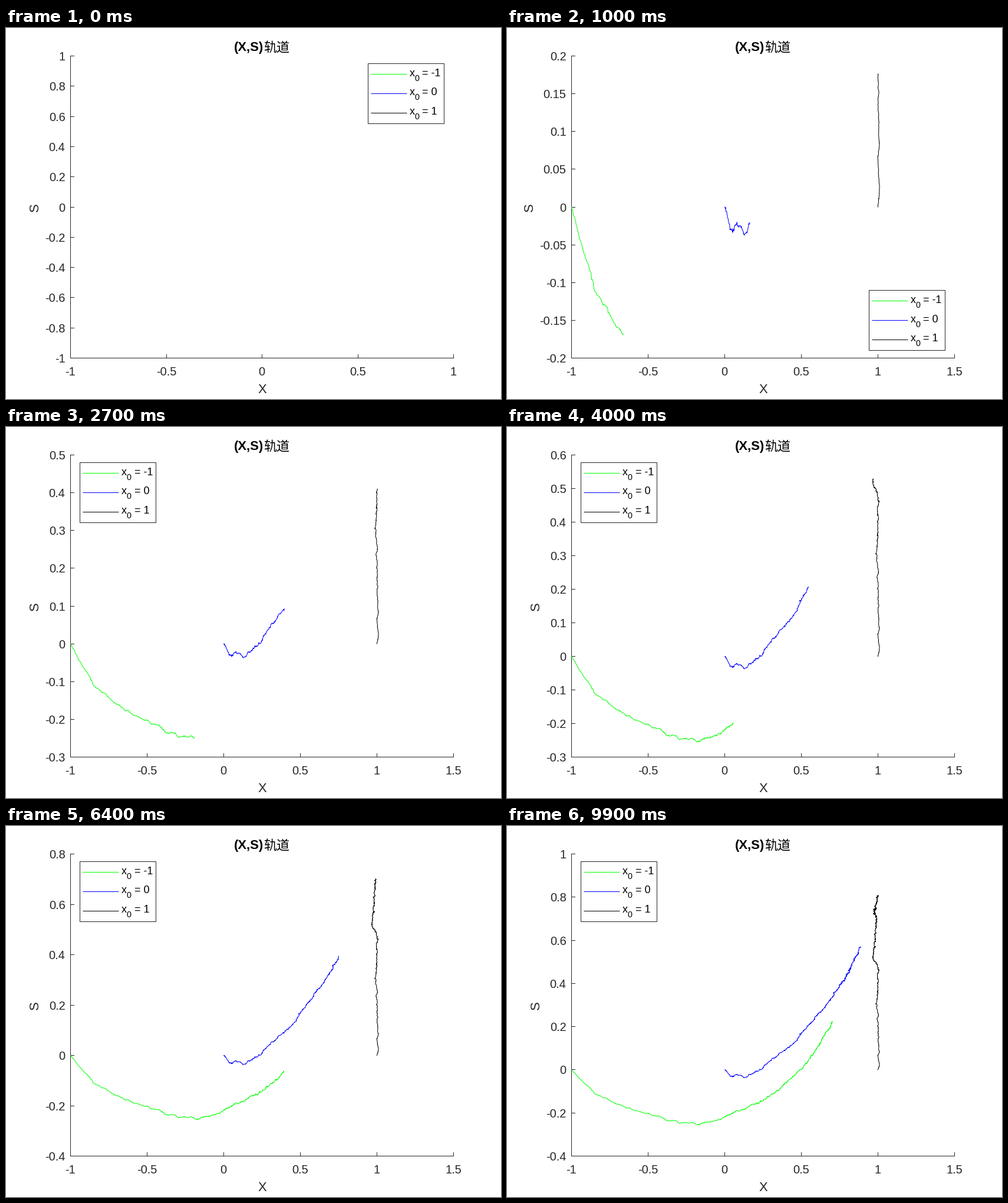
A matplotlib script that plays this animation: 840 by 630 pixels, repeating every 10 s.

```python
import numpy as np
import matplotlib.pyplot as plt
from matplotlib.animation import FuncAnimation
from matplotlib.patches import Rectangle

W, H, DPI = 840, 630, 70
PX = 72 / DPI                      # points per pixel
FRAMES, SUB, DT = 100, 10, .02     # samples and model time per frame
LEFT, RIGHT, TOP, BOTTOM = 109.5, 759.5, 47.5, 560.5
DARK = "#262626"
COLORS = ("#00ff00", "#0000ff", "#000000")

# A few (time, x, s) states that each random path passes through.
STATES = (
    [(0, -1, 0), (5, -.834, -.116), (17, -.446, -.213), (30, -.127, -.25),
     (40, .058, -.198), (64, .393, -.066), (77, .543, .04), (99, .703, .226)],
    [(0, 0, 0), (3, .05, -.032), (5, .078, -.018), (8, .13, -.033),
     (17, .258, .02), (40, .546, .203), (64, .75, .391), (85, .822, .472),
     (99, .88, .57)],
    [(0, 1, 0), (5, 1.004, .093), (17, .993, .287), (33, 1, .476),
     (38, .969, .51), (64, .99, .703), (77, .974, .741), (85, .983, .742),
     (99, 1, .81)],
)

plt.rcParams["path.snap"] = False


def model(t, x0):
    """Noise-free solution of dX = (1 - X) dt, dS = (X - S) dt."""
    tau = DT * t
    fade = np.exp(-tau)
    return np.column_stack([1 - (1 - x0) * fade,
                            1 - ((1 - x0) * tau + 1) * fade])


def trajectory(states, rng):
    """Model curve, drifted through the states, plus mean-reverting noise."""
    keys = np.array(states, float)
    t = np.arange((FRAMES - 1) * SUB + 1) / SUB
    drift = keys[:, 1:] - model(keys[:, 0], keys[0, 1])
    path = model(t, keys[0, 1])
    path += np.column_stack([np.interp(t, keys[:, 0], d) for d in drift.T])
    noise = np.zeros(2)
    for i in range(1, len(t)):
        noise = .9 * noise + rng.normal(0, (.0014, .0011))
        path[i] += noise
    return path


def nice_limits(lo, hi):
    """Smallest 1-2-5 step that covers the range in ten intervals or fewer."""
    for exp in range(-4, 1):
        for m in (1, 2, 5):
            step = m * 10.0 ** exp
            a, b = int(np.floor(lo / step)), int(np.ceil(hi / step))
            if b - a <= 10:
                return a, b, step, -exp


rng = np.random.default_rng(4)
paths = [trajectory(s, rng) for s in STATES]

fig = plt.figure(figsize=(W / DPI, H / DPI), dpi=DPI, facecolor="white")
ax = fig.add_axes([0, 0, 1, 1])
ax.set_xlim(0, W)
ax.set_ylim(H, 0)
ax.axis("off")
drawn = []


def text(x, y, s, size=20, color=DARK, ha="left", font="Liberation Sans", **kw):
    drawn.append(ax.text(x, y, s, fontsize=size * PX, color=color, ha=ha,
                         va="baseline", family=font, **kw))


def line(xs, ys, color=DARK, **kw):
    drawn.extend(ax.plot(xs, ys, color=color, lw=PX, **kw))


def crisp(v):
    return np.floor(v) + .5


def legend(dx, dy):
    box = Rectangle((614.5 + dx, 60.5 + dy), 129, 102, fc="white", ec=DARK,
                    lw=PX, zorder=3)
    drawn.append(ax.add_patch(box))
    for i, (color, x0) in enumerate(zip(COLORS, (-1, 0, 1))):
        y = dy + 78.5 + 33 * i
        base = dy + 82 + 32.5 * i
        line([620 + dx, 680 + dx], [y, y], color, zorder=4)
        text(684.5 + dx, base, "x", 18, "black", zorder=4)
        text(693.5 + dx, base + 8, "0", 14.4, "black", zorder=4)
        text(706.5 + dx, base, f"= {x0}", 18, "black", zorder=4)


def update(n):
    while drawn:
        drawn.pop().remove()

    shown = [p[:n * SUB + 1] for p in paths]
    if n:
        s = np.concatenate([p[:, 1] for p in shown])
        a, b, step, digits = nice_limits(s.min(), s.max())
        xmax = 1.5
    else:
        a, b, step, digits, xmax = -5, 5, .2, 1, 1

    def to_x(v):
        return LEFT + (RIGHT - LEFT) * (v + 1) / (xmax + 1)

    def to_y(v):
        return BOTTOM - (BOTTOM - TOP) * (v / step - a) / (b - a)

    for v in np.arange(-1, xmax + .1, .5):
        x = crisp(to_x(v))
        line([x, x], [BOTTOM, BOTTOM - 6])
        text(x - .5, 590, f"{v:g}", ha="center")
    for k in range(a, b + 1):
        y = crisp(to_y(k * step))
        line([LEFT, LEFT + 6], [y, y])
        text(100.5, y + 7.5, f"{k * step:.6g}", ha="right")
    line([LEFT, LEFT, RIGHT], [TOP, BOTTOM, BOTTOM])

    text(435, 620, "X", 22, ha="center")
    text(55 - 11 * (digits - 1), 304.5, "S", 22, ha="center",
         rotation=90, rotation_mode="anchor")
    text(387, 39, "(X,S)", 22, "black", weight="bold")
    text(437.5, 39.5, "轨道", 22, "black", font="Noto Sans CJK JP")

    if n:
        for p, color in zip(shown, COLORS):
            line(to_x(p[:, 0]), to_y(p[:, 1]), color)

    if n == 0:
        legend(0, 0)
    elif b * step < .35:
        legend(0, 385)
    else:
        legend(-489, 0)
    return drawn


anim = FuncAnimation(fig, update, frames=FRAMES, interval=100,
                     repeat=True, repeat_delay=0, blit=False)
plt.show()
```
